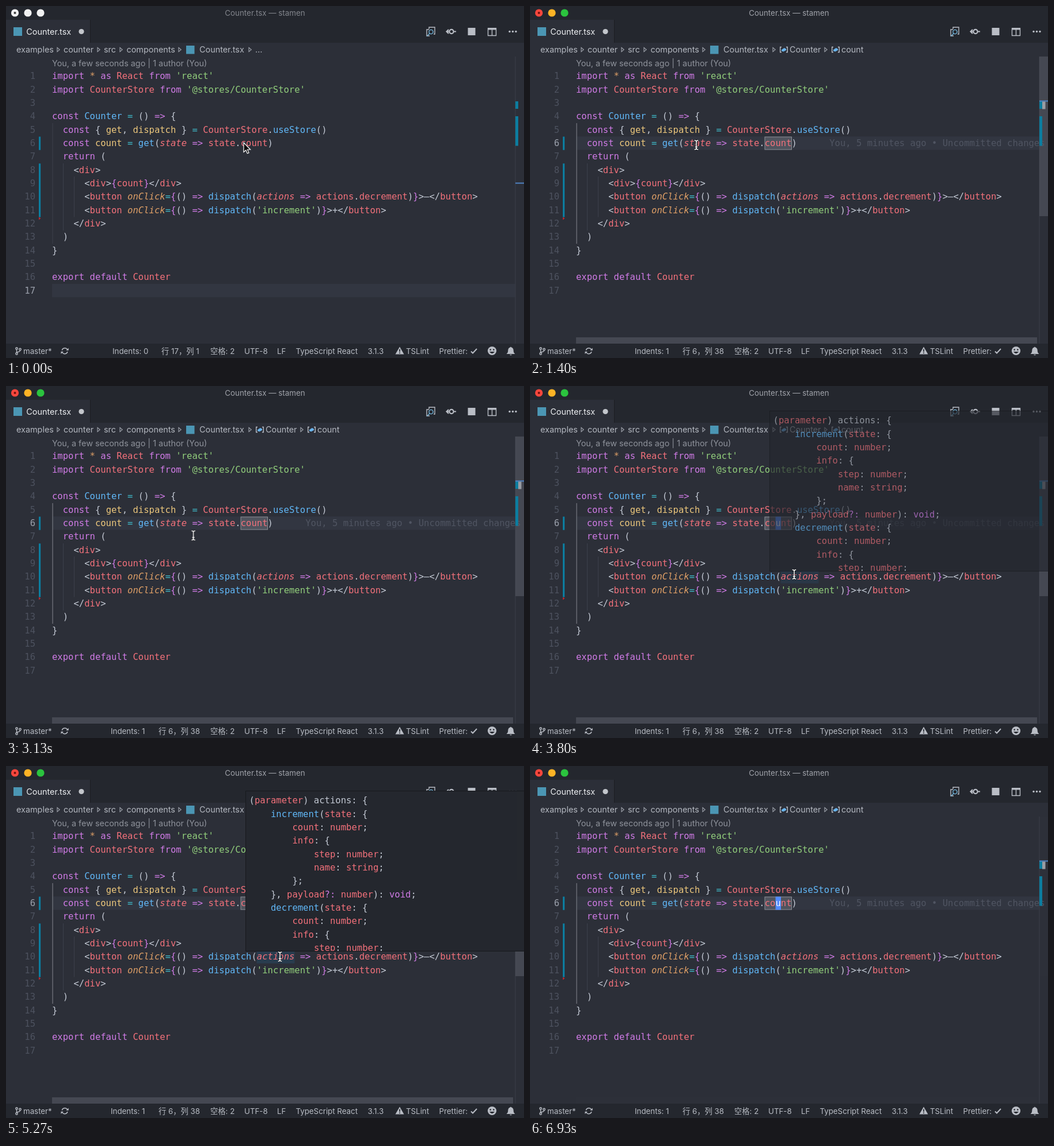
Animation, 900 px wide and 613 px high, one loop 6990 ms. Source, as an HTML page:

```html
<!DOCTYPE html>
<html lang="en">
<head>
<meta charset="utf-8">
<title>Editor</title>
<style>
html, body { margin: 0; width: 100%; height: 100%; overflow: hidden; background: #2c2f38; }
svg { display: block; width: 100vw; height: 100vh; }
text { white-space: pre; }
.code text { font: 15.556px "DejaVu Sans Mono", Menlo, monospace; }
.ui text { font: 14.4px Inter, "Noto Sans CJK SC", "Noto Sans CJK", sans-serif; fill: #b4b8c0; }
.ui .title { font-size: 13.35px; }
.ui .status text { font-size: 13.3px; fill: #b9bdc5; }
.line { fill: none; stroke: #b9bdc5; stroke-width: 1.4; }
.fill { fill: #b9bdc5; }

.off, .on, .late, .caret, .tip1, .tip2, .bars, .tipbar, .mouse { animation: 6990ms infinite; }
.off { animation-name: off; animation-timing-function: step-end; }
.on { animation-name: on; animation-timing-function: step-end; }
.late { animation-name: late; animation-timing-function: step-end; }
.caret { animation-name: blink; animation-timing-function: step-end; }
.tip1 { animation-name: tip1; animation-timing-function: linear; }
.tip2 { animation-name: tip2; animation-timing-function: linear; }
.bars { animation-name: bars; animation-timing-function: linear; }
.tipbar { animation-name: tipbar; animation-timing-function: linear; }
.mouse { animation-name: mouse; animation-timing-function: ease-in-out; }

@keyframes off { 0% { opacity: 1 } 6.72%, 100% { opacity: 0 } }
@keyframes on { 0% { opacity: 0 } 6.72%, 100% { opacity: 1 } }
@keyframes late { 0% { opacity: 0 } 10.4%, 100% { opacity: 1 } }
@keyframes blink {
  0%, 13.88%, 28.18%, 42.49%, 56.8%, 71.1%, 85.41%, 99.71%, 100% { opacity: 0 }
  6.72%, 21.03%, 35.34%, 49.64%, 63.95%, 78.25%, 92.56% { opacity: 1 }
}
@keyframes tip1 { 0%, 24.3% { opacity: 0 } 25.75%, 43.9% { opacity: 1 } 43.91%, 100% { opacity: 0 } }
@keyframes tip2 { 0%, 53.43% { opacity: 0 } 54.86%, 86.8% { opacity: 1 } 86.81%, 100% { opacity: 0 } }
@keyframes bars { 0%, 6.72% { opacity: 0 } 8.15%, 87.7% { opacity: 1 } 99.14%, 100% { opacity: .06 } }
@keyframes tipbar { 0%, 54.86% { opacity: 0 } 56.3%, 64.4% { opacity: 1 } 75.8%, 100% { opacity: 0 } }
@keyframes mouse {
  0% { transform: translate(413px, 238px) }
  4%, 9% { transform: translate(431px, 243px) }
  18% { transform: translate(291px, 242px) }
  20% { transform: translate(289px, 242px) }
  30%, 42.9% { transform: translate(286px, 240px) }
  48.5% { transform: translate(452px, 325px) }
  54.36% { transform: translate(459px, 328px) }
  60% { transform: translate(476px, 332px) }
  83.8% { transform: translate(476px, 332px); animation-timing-function: ease-in }
  85.84% { transform: translate(584px, 481px); animation-timing-function: linear }
  87.7%, 100% { transform: translate(690px, 627px) }
}
</style>
</head>
<body>
<svg viewBox="0 0 900 613" xmlns="http://www.w3.org/2000/svg">
  <defs>
    <clipPath id="tipClip"><rect x="417" y="44" width="483" height="278"/></clipPath>
    <path id="sep" d="M-2 -3.6 L2.2 0 L-2 3.6 Z" fill="none" stroke="#a3a7b0" stroke-width="1.1"/>
    <g id="symbol">
      <path class="line" d="M-4 -4.5 H-6.3 V4.5 H-4 M4 -4.5 H6.3 V4.5 H4"/>
      <path fill="#69b4ee" d="M-4 .2 L.8 -3 L4 -1.3 V1 L-.8 3.6 L-4 2.2 Z"/>
    </g>
    <path id="beam" d="M-3.2 -8 Q0 -8 0 -5.5 V5.5 Q0 8 -3.2 8 M3.2 -8 Q0 -8 0 -5.5 M3.2 8 Q0 8 0 5.5 M-2 3.5 H2" fill="none"/>
  </defs>

  <rect width="900" height="613" fill="#2c2f38"/>

  <g class="off"><rect x="80" y="484" width="805" height="23.3" fill="#323641"/></g>
  <g class="on"><rect x="80" y="227.2" width="805" height="23.3" fill="#323641"/></g>
  <g class="tip1"><rect x="267" y="227.5" width="47" height="23" fill="#293c4e"/></g>
  <g class="tip2"><rect x="435.5" y="320.8" width="66" height="23" fill="#293c4e"/></g>
  <g class="late"><rect x="408" y="228" width="46.5" height="22" fill="#50545e" stroke="#8d9097"/></g>

  <g fill="#3c404b">
    <rect x="80.5" y="204" width="1" height="210"/>
    <rect x="99" y="274" width="1" height="117"/>
    <rect x="118" y="297" width="1" height="70.5"/>
  </g>
  <rect class="on" x="80.5" y="204" width="1.1" height="210" fill="#777a82"/>
  <g fill="#0c7d9f">
    <rect x="57" y="227.5" width="3.2" height="23.3"/>
    <rect x="57" y="274.3" width="3.2" height="93.4"/>
  </g>
  <path d="M57 367.5 L60.5 370 L57 372.5 Z" fill="#c2262e"/>

  <g class="code" id="code"></g>
  <g class="code">
    <text class="off" x="51" y="500.8" text-anchor="end" fill="#959aa5">17</text>
    <text class="on" x="51" y="244.1" text-anchor="end" fill="#959aa5">6</text>
    <text class="late" x="520.2" y="244.1" fill="#505562">You, 5 minutes ago • Uncommitted changes</text>
    <g class="caret">
      <rect x="426.6" y="227.5" width="9.4" height="23" fill="#528bff"/>
      <text x="426.6" y="244.1" fill="#f4f6fa">u</text>
    </g>
  </g>

  <rect x="884.5" y="88" width="1" height="500" fill="#3a3e48"/>
  <g class="bars" fill="#5c606b" fill-opacity=".52">
    <rect x="885" y="88" width="15" height="278"/>
    <rect x="80" y="577" width="801" height="11"/>
  </g>
  <g fill="#0c7d9f">
    <rect x="885" y="166" width="5" height="13"/>
    <rect x="885" y="192" width="5" height="51.5"/>
  </g>
  <rect class="off" x="885" y="307.5" width="15" height="2" fill="#4f83c4"/>
  <g class="on">
    <rect x="885" y="164.5" width="15" height="2" fill="#4f83c4"/>
    <rect class="late" x="890" y="166.5" width="5.5" height="13" fill="#999ca3"/>
  </g>

  <g class="ui">
    <rect width="900" height="64" fill="#24272e"/>
    <rect y="24" width="146" height="40" fill="#2c2f38"/>
    <rect x="146" y="24" width="1" height="40" fill="#1b1d22"/>
    <g class="off">
      <g fill="#f1f1f1" id="idle"></g>
      <circle cx="15.5" cy="12" r="2" fill="#3a3a3a"/>
      <text class="title" x="450" y="16.8" text-anchor="middle" style="fill:#83868d">Counter.tsx — stamen</text>
    </g>
    <g class="on">
      <g id="lights"></g>
      <circle cx="15.5" cy="12" r="2" fill="#6e0f0b"/>
      <text class="title" x="450" y="16.8" text-anchor="middle" style="fill:#a0a3aa">Counter.tsx — stamen</text>
    </g>

    <rect x="13" y="37" width="15" height="15" fill="#4b96b4"/>
    <text x="35.3" y="50" style="fill:#eceef1">Counter.tsx</text>
    <circle cx="131" cy="44.5" r="4.6" fill="#c3c6cc"/>

    <g class="line">
      <path d="M735 40 V37 H745 V49 H743 M735 41 H731 V52 H736" />
      <g stroke="#74b7dc"><circle cx="738.5" cy="45" r="3.6"/><path d="M736 47.8 L731.5 52.5"/></g>
      <g stroke-width="2.2"><circle cx="774" cy="44.5" r="3.6"/><path d="M765 44.5 H770 M778 44.5 H782 M769 41 L765.5 44.5 L769 48"/></g>
      <path d="M837.5 39 H851.5 V51.5 H837.5 Z M844.5 39 V51.5"/>
    </g>
    <g class="fill">
      <rect x="802.5" y="38" width="13" height="13"/>
      <rect x="837" y="38" width="15" height="3.5"/>
      <circle cx="875" cy="44.5" r="1.7"/><circle cx="880.5" cy="44.5" r="1.7"/><circle cx="886" cy="44.5" r="1.7"/>
    </g>

    <g id="crumbs"></g>
    <rect x="313" y="69" width="14.5" height="14.5" fill="#4b96b4"/>
    <text class="off" x="433" y="81">…</text>
    <g class="on">
      <use href="#symbol" x="441" y="76"/>
      <text x="451" y="81">Counter</text>
      <use href="#sep" x="514" y="76"/>
      <use href="#symbol" x="531" y="76"/>
      <text x="541" y="81">count</text>
    </g>
    <text x="80" y="105.3" style="fill:#8e929b">You, a few seconds ago | 1 author (You)</text>

    <g class="status">
      <rect y="588" width="900" height="25" fill="#24272e"/>
      <g class="off">
        <text x="185" y="605.5">Indents: 0</text>
        <text x="270" y="605.5">行 17，列 1</text>
      </g>
      <g class="on">
        <text x="182" y="605.5">Indents: 1</text>
        <text x="265" y="605.5">行 6，列 38</text>
      </g>
      <g id="status"></g>
      <g class="line">
        <circle cx="18.5" cy="596.5" r="1.7"/><circle cx="18.5" cy="605.5" r="1.7"/><circle cx="24.5" cy="598" r="1.7"/>
        <path d="M18.5 598 V604 M24.5 600 Q24.5 602 19 603"/>
        <path d="M97.3 599.5 A5 5 0 0 1 106.6 598.5 M106.9 602 A5 5 0 0 1 97.6 603"/>
        <path d="M808 601.5 L811 604.5 L818 597" stroke-width="2"/>
      </g>
      <g class="fill">
        <path d="M104.5 599.7 H108.7 V595.5 Z M99.7 601.8 H95.5 V606 Z"/>
        <path d="M684 593.5 L691.5 606.5 H676.5 Z"/>
        <circle cx="844.5" cy="600.5" r="7.6"/>
        <path d="M869.5 606 Q872.3 604 872.3 599.5 Q872.6 595.3 876 594.5 Q877 592.5 878 594.5 Q881.4 595.3 881.7 599.5 Q881.7 604 884.5 606 Z M875 607 H879 Q877 609.5 875 607 Z"/>
      </g>
      <g fill="#24272e">
        <rect x="683.2" y="597.5" width="1.7" height="4.7"/><rect x="683.2" y="603.4" width="1.7" height="1.7"/>
        <circle cx="841.7" cy="598.6" r="1.3"/><circle cx="847.3" cy="598.6" r="1.3"/>
        <path d="M840 602 H849 Q844.5 608.5 840 602 Z"/>
      </g>
    </g>
  </g>

  <g class="tip1 code">
    <rect x="268.5" y="56.5" width="208.5" height="173" fill="#24272e" stroke="#17191d"/>
    <g id="tip1"></g>
  </g>
  <g class="tip2 code">
    <rect x="416.5" y="43.5" width="484" height="279" fill="#24272e" stroke="#17191d"/>
    <g id="tip2" clip-path="url(#tipClip)"></g>
    <rect class="tipbar" x="888" y="44" width="11" height="154" fill="#373a43"/>
  </g>

  <g class="mouse">
    <path class="off" d="M0 0 V16.5 L3.8 13 L6.3 18.8 L9 17.6 L6.5 12 H11.6 Z" fill="#0a0a0a" stroke="#fff" stroke-width="1.2"/>
    <g class="on">
      <use href="#beam" stroke="#15171b" stroke-width="3.2"/>
      <use href="#beam" stroke="#fff" stroke-width="1.5"/>
    </g>
  </g>
</svg>
<script>
const CHAR = 9.366, ROW = 23.335;
const colors = {
  w: '#c3c9d4', p: '#d07be6', r: '#f3717b', b: '#61b8f8',
  g: '#92cf7c', y: '#ecc77c', c: '#3fbccb', o: '#e0a067'
};
const $ = id => document.getElementById(id);
const esc = s => s.replace(/&/g, '&amp;').replace(/</g, '&lt;');

// "~" plus a colour letter starts a token; a capital letter makes it italic.
const tokens = src => src.split('~').slice(1).map(part => {
  const key = part[0], low = key.toLowerCase();
  const slant = key === low ? '' : ' font-style="italic"';
  return `<tspan fill="${colors[low]}"${slant}>${esc(part.slice(1))}</tspan>`;
}).join('');

const block = (x, y, src) => src.split('\n').map((line, i) => {
  const indent = line.search(/\S|$/);
  return `<text x="${x + indent * CHAR}" y="${y + i * ROW}">${tokens(line)}</text>`;
}).join('');

const source = `~pimport ~o* ~pas ~rReact ~pfrom ~g'react'
~pimport ~rCounterStore ~pfrom ~g'@stores/CounterStore'

~pconst ~bCounter ~c= ~w() ~p=> ~w{
  ~pconst ~w{ ~yget~w, ~ydispatch ~w} ~c= ~rCounterStore~w.~buseStore~w()
  ~pconst ~ycount ~c= ~bget~w(~Rstate ~p=> ~rstate~w.~rcount~w)
  ~preturn ~w(
    ~w<~rdiv~w>
      ~w<~rdiv~w>~p{~rcount~p}~w</~rdiv~w>
      ~w<~rbutton ~OonClick~c=~p{~w() ~p=> ~bdispatch~w(~Ractions ~p=> ~ractions~w.~rdecrement~w)~p}~w>–</~rbutton~w>
      ~w<~rbutton ~OonClick~c=~p{~w() ~p=> ~bdispatch~w(~g'increment'~w)~p}~w>+</~rbutton~w>
    ~w</~rdiv~w>
  ~w)
~w}

~pexport default ~rCounter
`;

const stateTip = `~w(~rparameter~w) state: {
    ~wcount: ~rnumber~w;
    ~winfo: {
        ~wstep: ~rnumber~w;
        ~wname: ~rstring~w;
    ~w};
~w}`;

const method = name => `    ~b${name}~w(~rstate~w: {
        ~rcount~w: ~rnumber~w;
        ~rinfo~w: {
            ~rstep~w: ~rnumber~w;
            ~rname~w: ~rstring~w;
        ~w};
    ~w}, ~rpayload~p?: ~rnumber~w): ~pvoid~w;`;
const actionsTip = ['~w(~rparameter~w) actions: {', method('increment'), method('decrement')].join('\n');

const numbers = Array.from({ length: 17 }, (_, i) =>
  `<text x="51" y="${127.4 + i * ROW}" text-anchor="end" fill="#4d525f">${i + 1}</text>`).join('');
$('code').innerHTML = numbers + block(80, 127.4, source);
$('tip1').innerHTML = block(274.5, 77.4, stateTip);
$('tip2').innerHTML = block(422.5, 65.4, actionsTip);

const labels = (y, list) => list.map(([x, s]) => `<text x="${x}" y="${y}">${s}</text>`).join('');
$('crumbs').innerHTML =
  labels(81, [[18, 'examples'], [100, 'counter'], [170, 'src'], [209.5, 'components'], [336, 'Counter.tsx']]) +
  [91, 161, 200, 302, 424].map(x => `<use href="#sep" x="${x}" y="76"/>`).join('');
$('status').innerHTML = labels(605.5, [
  [30, 'master*'], [355, '空格: 2'], [414, 'UTF-8'], [471, 'LF'],
  [503.5, 'TypeScript React'], [628.5, '3.1.3'], [695, 'TSLint'], [752.5, 'Prettier:']
]);

const dots = fills => [15.5, 38, 60].map((x, i) =>
  `<circle cx="${x}" cy="12" r="6.6" fill="${fills[i] || '#f1f1f1'}"/>`).join('');
$('idle').innerHTML = dots([]);
$('lights').innerHTML = dots(['#f9473d', '#fdb325', '#2bc33e']);
</script>
</body>
</html>
```
